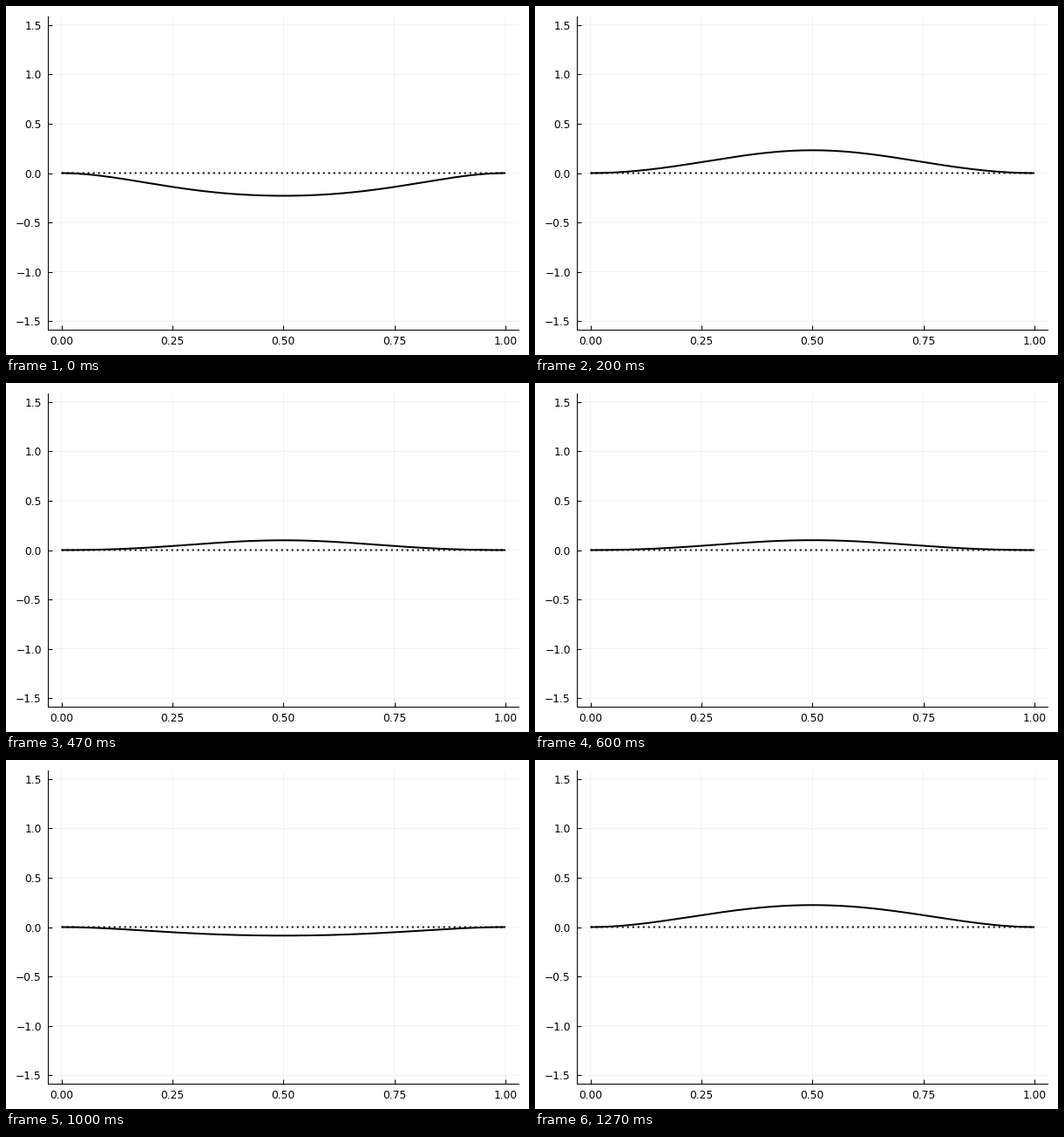
Animation, 600 px wide and 400 px high, one loop 1340 ms. Source, as a matplotlib script:

```python
import numpy as np
import matplotlib.pyplot as plt
from matplotlib.animation import FuncAnimation

W, H, DPI = 600, 400, 100
PX = 72 / DPI  # one pixel in points
STEPS = 20
TICK, TICKS = 10, 134  # a step lasts 6 or 7 ticks

plt.rcParams["font.family"] = "DejaVu Sans"

# Odd bending modes of a beam clamped at both ends: (wave number, amplitude)
MODES = [(4.730041, -0.151), (10.995608, -0.007)]


def mode_shape(beta, x):
    sigma = (np.cosh(beta) - np.cos(beta)) / (np.sinh(beta) - np.sin(beta))
    z = beta * x
    return np.cosh(z) - np.cos(z) - sigma * (np.sinh(z) - np.sin(z))


x = np.linspace(0, 1, 201)
shapes = [(beta**2, amp * mode_shape(beta, x)) for beta, amp in MODES]


def deflection(t):
    return sum(shape * np.cos(omega * t) for omega, shape in shapes)


fig = plt.figure(figsize=(W / DPI, H / DPI), dpi=DPI, facecolor="white")
left, right, top, bottom = 48.4, 588.3, 11.6, 371.4
ax = fig.add_axes([left / W, 1 - bottom / H, (right - left) / W, (bottom - top) / H])
ax.set_xlim(-0.03, 1.03)
ax.set_ylim(-1.59, 1.59)
ax.set_xticks(np.linspace(0, 1, 5))
ax.set_yticks(np.linspace(-1.5, 1.5, 7))

ax.set_axisbelow(True)
ax.grid(color="black", alpha=0.1, linewidth=0.5 * PX, snap=False)
ax.tick_params(direction="in", length=5 * PX, width=PX, labelsize=12.3 * PX)
ax.tick_params(axis="x", pad=6.5 * PX)
ax.tick_params(axis="y", pad=7.5 * PX)
for side in ("top", "right"):
    ax.spines[side].set_visible(False)
for side in ("left", "bottom"):
    ax.spines[side].set_linewidth(PX)

line = dict(color="black", linewidth=2 * PX, snap=False)
ax.plot([0, 1], [0, 0], linestyle=(0, (1, 2)), dash_capstyle="butt", **line)
beam, = ax.plot(x, deflection(0), solid_capstyle="butt", **line)


def update(i):
    step = min((3 * i + 1) // 20, STEPS - 1)
    beam.set_ydata(deflection(step / (STEPS - 1)))
    return beam,


anim = FuncAnimation(fig, update, frames=TICKS, interval=TICK,
                     repeat=True, repeat_delay=0)
plt.show()
```
